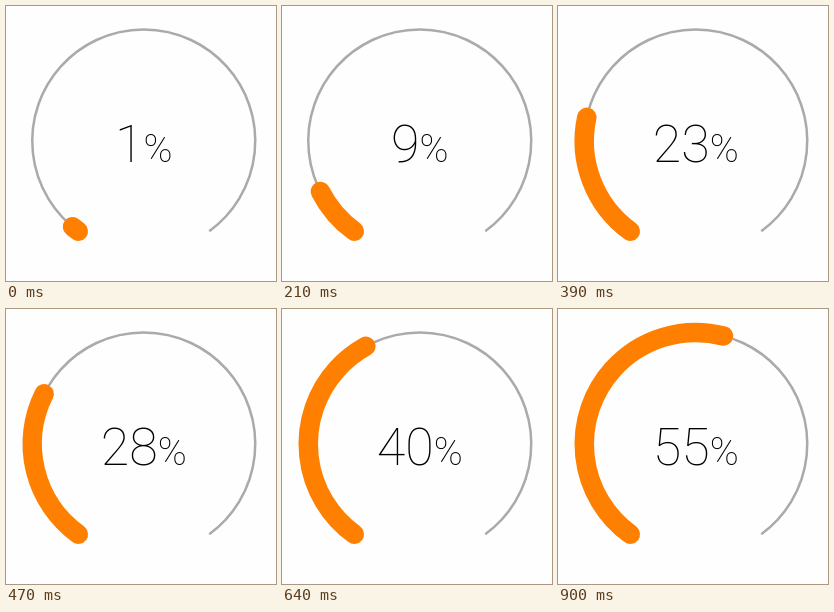
Write an HTML page that moves like this. It is 270x275 px and loops after 2100 ms.

```html
<!DOCTYPE html>
<html lang="en">
<head>
<meta charset="utf-8">
<title>Progress gauge</title>
<style>
  html, body { margin: 0; height: 100%; overflow: hidden; background: #fefefe; }
  svg { display: block; }
  path { fill: none; }
  text { font: 200 52px Roboto, "Liberation Sans", sans-serif; text-anchor: middle; }
  .unit { font-size: 39px; }
</style>
</head>
<body>
<svg width="270" height="275" viewBox="0 0 270 275">
  <path d="M72.25 225.2A111.5 111.5 0 1 1 203.25 225.2" stroke="#aaa" stroke-width="2.5"/>
  <path id="bar" d="M72.25 225.2A111.5 111.5 0 1 1 203.25 225.2" pathLength="100"
        stroke="#ff8000" stroke-width="19.5" stroke-linecap="round"/>
  <text x="137.75" y="156"><tspan id="num"></tspan><tspan class="unit">%</tspan></text>
</svg>
<script>
const LOOP = 2100;
const bar = document.getElementById('bar');
const num = document.getElementById('num');

// The gauge advances in small uneven ticks (ms).
const ticks = [0, 30, 60, 90, 120, 150, 180, 210, 230, 270, 310, 330, 360, 390, 430, 470,
  490, 520, 550, 580, 610, 640, 670, 710, 750, 780, 800, 820, 850, 870, 900];

// [time in ms, percent]
const keys = [[0, 1.3], [210, 9.4], [310, 18], [470, 28], [550, 34.2], [640, 40],
  [750, 47.2], [900, 55]];

function percentAt(t) {
  const i = keys.findIndex(([time]) => time >= t);
  if (i === 0) return keys[0][1];
  const [t0, p0] = keys[i - 1], [t1, p1] = keys[i];
  return p0 + (p1 - p0) * (t - t0) / (t1 - t0);
}

const start = performance.now();

function draw() {
  const t = (performance.now() - start) % LOOP;
  const p = percentAt(ticks.findLast(tick => tick <= t));
  bar.setAttribute('stroke-dasharray', `${p} 200`);
  num.textContent = Math.round(p);
  requestAnimationFrame(draw);
}
draw();
</script>
</body>
</html>
```
